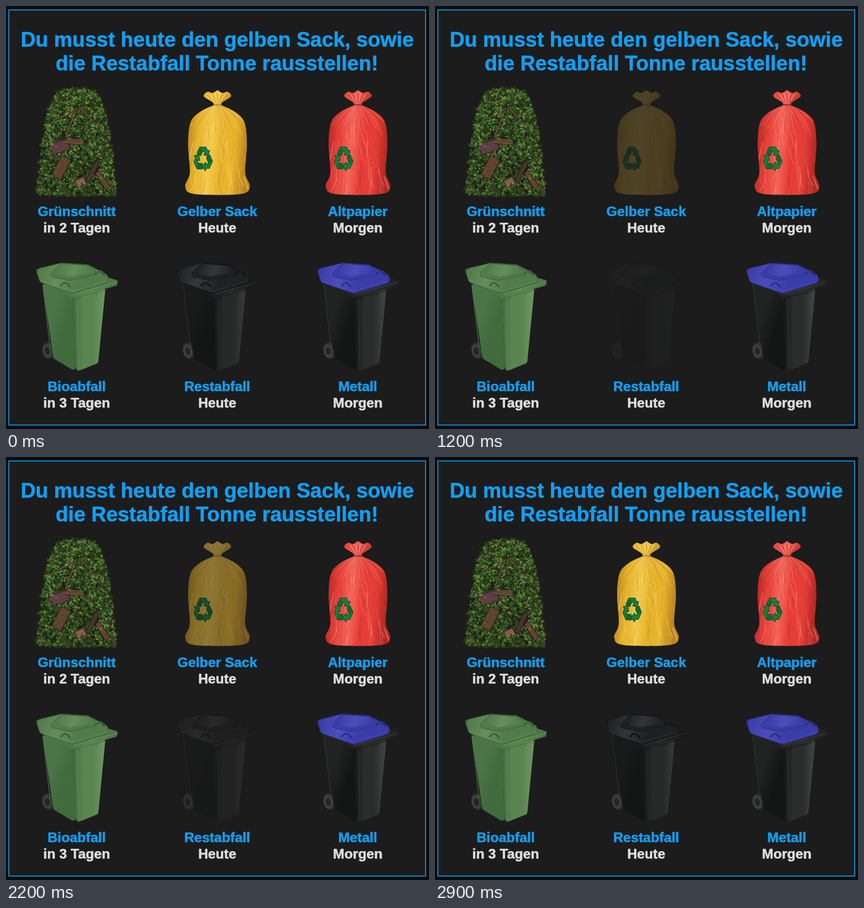
Animation of 748 by 749 pixels, one loop 3000 ms. Source, as an HTML page with a canvas:

```html
<!DOCTYPE html>
<html lang="de">
<head>
<meta charset="utf-8">
<title>Abfallkalender</title>
<style>
html, body { margin: 0; width: 100%; height: 100%; overflow: hidden; background: #0b0b0b; }
canvas { display: block; }
</style>
</head>
<body>
<canvas id="stage" width="748" height="749"></canvas>
<script>
const W = 748, H = 749, LOOP = 3000, STEP = 100, FAINTEST = 0.15;
const COLUMN = 248.5, ROW = 310;
const BLUE = '#119ff2', WHITE = '#dedede';
const stage = document.getElementById('stage').getContext('2d');

function seeded(seed) {
  return () => {
    seed = (seed * 1664525 + 1013904223) >>> 0;
    return seed / 4294967296;
  };
}

function layer(paint) {
  const canvas = document.createElement('canvas');
  canvas.width = W;
  canvas.height = H;
  const c = canvas.getContext('2d');
  c.lineJoin = c.lineCap = 'round';
  paint(c);
  return canvas;
}

function place(c, paint, dx, tone) {
  c.save();
  c.translate(dx, 0);
  paint(c, tone);
  c.restore();
}

function gradient(c, x0, y0, x1, y1, ...colours) {
  const g = c.createLinearGradient(x0, y0, x1, y1);
  colours.forEach((colour, i) => g.addColorStop(i / (colours.length - 1), colour));
  return g;
}

// Closed polygon with rounded corners.
function poly(c, points, radius, fill, line) {
  const [x, y] = points[0], [u, v] = points.at(-1);
  c.beginPath();
  c.moveTo((x + u) / 2, (y + v) / 2);
  points.forEach(([px, py], i) => c.arcTo(px, py, ...points[(i + 1) % points.length], radius));
  c.closePath();
  c.fillStyle = fill;
  c.fill();
  if (line) { c.strokeStyle = line; c.lineWidth = 1; c.stroke(); }
}

// Closed smooth curve passing through every point.
function smooth(c, points, fill) {
  const at = (i) => points[(i + points.length) % points.length];
  c.beginPath();
  c.moveTo(...at(0));
  for (let i = 0; i < points.length; i++) {
    const [a, b, d, e] = [at(i - 1), at(i), at(i + 1), at(i + 2)];
    c.bezierCurveTo(b[0] + (d[0] - a[0]) / 6, b[1] + (d[1] - a[1]) / 6,
      d[0] - (e[0] - b[0]) / 6, d[1] - (e[1] - b[1]) / 6, ...d);
  }
  c.fillStyle = fill;
  c.fill();
}

// Half widths with heights become a left and a right side.
function mirror(half, cx) {
  return [...half.map(([w, y]) => [cx - w, y]), ...half.map(([w, y]) => [cx + w, y]).reverse()];
}

function line(c, colour, width, ...points) {
  c.strokeStyle = colour;
  c.lineWidth = width;
  c.beginPath();
  points.forEach((p) => c.lineTo(...p));
  c.stroke();
}

function curve(c, colour, width, from, bend, to) {
  c.strokeStyle = colour;
  c.lineWidth = width;
  c.beginPath();
  c.moveTo(...from);
  c.quadraticCurveTo(...bend, ...to);
  c.stroke();
}

function ellipse(c, x, y, rx, ry, angle, fill) {
  c.fillStyle = fill;
  c.beginPath();
  c.ellipse(x, y, rx, ry, angle, 0, 7);
  c.fill();
}

function recycleArrows(c, x, y) {
  c.save();
  c.translate(x, y);
  c.scale(0.84, 1.12);
  for (let i = 0; i < 3; i++) {
    poly(c, [[-13, -9], [-7, -19], [6, -19], [10, -13], [14, -14], [11, -4], [1, -7],
      [4, -10], [0, -13], [-5, -5]], 0.5, '#16803c', '#17391f');
    poly(c, [[-13, -9], [-7, -19], [0, -13], [-5, -5]], 0.5, '#0f6930');
    c.rotate(Math.PI * 2 / 3);
  }
  c.restore();
}

function paintSack(c, tone) {
  const random = seeded(17), cx = 374;
  const body = mirror([[7, 176], [33, 189], [48, 207], [52, 245], [49, 295], [57, 320], [40, 333]], cx);
  smooth(c, body, gradient(c, 320, 220, 427, 230,
    tone.dark, tone.mid, tone.light, tone.mid, tone.mid, tone.dark));
  c.save();
  c.clip();
  for (let i = 0; i <= 40; i++) {
    const a = i / 20 - 1;
    c.globalAlpha = 0.2 + random() * 0.35;
    curve(c, i % 2 ? tone.shine : tone.dark, 0.6 + random() * 0.7,
      [cx + a * 5, 176], [cx + a * 27, 184], [cx + a * 50, 203 + random() * 26]);
  }
  for (let i = 0; i < 90; i++) {
    const x = 322 + random() * 104, y = 205 + random() * 115;
    c.globalAlpha = 0.1 + random() * 0.22;
    curve(c, i % 2 ? tone.shine : tone.dark, 0.7 + random() * 1.5,
      [x, y], [x + 5 - random() * 10, y + 12], [x + (x - cx) * 0.1 + 8 - random() * 16, y + 20 + random() * 20]);
  }
  c.restore();
  smooth(c, mirror([[6, 178], [8, 171], [24, 160], [18, 152], [9, 154], [0, 149]], cx),
    gradient(c, 350, 150, 396, 174, tone.mid, tone.light, tone.dark));
  for (let i = -4; i <= 4; i++) {
    line(c, i % 2 ? tone.shine : tone.dark, 0.8, [cx + i * 0.8, 173], [cx + i * 4.4, 155 + Math.abs(i) * 0.6]);
  }
  line(c, tone.dark, 2, [368, 175], [380, 175]);
  recycleArrows(c, 348.5, 271);
}

function plank(c, x, y, length, width, angle, colour) {
  c.save();
  c.translate(x, y);
  c.rotate(angle);
  c.fillStyle = '#241b14';
  c.fillRect(-length / 2 - 1, -width / 2 - 1, length + 2, width + 2);
  c.fillStyle = colour;
  c.fillRect(-length / 2, -width / 2, length, width);
  for (let v = -width / 2 + 2; v < width / 2 - 1; v += 3) {
    line(c, '#2c1c1899', 0.9, [-length / 2, v], [length / 2, v]);
  }
  c.restore();
}

function paintCuttings(c) {
  const random = seeded(91), cx = 125, top = 147, height = 188;
  const halfWidth = (t) => 71.5 * Math.pow(t, 0.23);
  const foliage = (darkest, lightest) =>
    `hsl(${70 + random() * 42} ${26 + random() * 24}% ${darkest + random() * (lightest - darkest)}%)`;
  const leaves = (count, size, darkest, lightest) => {
    for (let i = 0; i < count; i++) {
      const t = random();
      const x = cx + (random() * 2 - 1) * halfWidth(t), r = size * (0.5 + random());
      ellipse(c, x, top + t * height, r, r * 0.5, random() * 6.3, foliage(darkest, lightest));
    }
  };
  ellipse(c, cx, 328, 71, 10, 0, '#29351c');
  leaves(1500, 4.5, 9, 22);
  // Fern tips break up the silhouette.
  for (let i = 0; i < 160; i++) {
    const t = random() * 0.9, side = i % 2 ? 1 : -1;
    const x = cx + side * halfWidth(t) * (0.75 + random() * 0.25), y = top + t * height;
    line(c, foliage(16, 30), 0.9, [x - side * 5, y + 7], [x + side * random() * 4, y - random() * 6]);
  }
  leaves(1300, 2.2, 14, 43);

  const wood = '#6f4b38', bark = '#765a3d', maroon = '#6d4351';
  plank(c, 115, 207, 56, 2, 1.93, bark);
  plank(c, 147, 197, 52, 2, 0.78, bark);
  plank(c, 109, 191, 40, 2, -0.5, bark);
  plank(c, 95, 249, 32, 17, -0.35, maroon);
  plank(c, 122, 240, 32, 9, 0.1, wood);
  plank(c, 98, 286, 38, 17, 2.05, wood);
  plank(c, 153, 294, 38, 6, 2.03, '#4c3a2f');
  plank(c, 171, 308, 34, 8, 1, wood);
  plank(c, 132, 312, 16, 12, -0.5, '#9a6a5b');
  leaves(350, 2, 14, 45);
}

function paintBin(c, tone) {
  ellipse(c, 75, 610, 11, 15, -0.2, '#2c2d2c');
  ellipse(c, 73, 611, 8, 12, -0.2, '#3e403e');
  ellipse(c, 73, 611, 4.5, 7, -0.2, '#242524');

  const corner = [118, 510], foot = [124, 648];
  poly(c, [[64, 489], corner, foot, [84, 624]], 5,
    gradient(c, 65, 500, 124, 520, tone.left, tone.left, tone.shade));
  poly(c, [corner, [176, 498], [163, 632], foot], 5,
    gradient(c, 118, 560, 172, 560, tone.shade, tone.right, tone.right, tone.edge));
  line(c, tone.edge, 0.8, [65, 493], [78, 604]);
  line(c, tone.edge, 0.8, [126, 518], [129, 642]);
  line(c, tone.edge, 0.8, [174, 506], [162, 628]);

  // Rim below the lid, ending in the grip on the right.
  poly(c, [[59, 484], [118, 504], [174, 479], [198, 486], [196, 495], [118, 517]], 3,
    gradient(c, 110, 500, 190, 505, tone.left, tone.right, tone.left));
  line(c, tone.edge, 1, [119, 511], [196, 489]);
  line(c, tone.shade, 1.2, [119, 518], [177, 503]);
  for (const x of [131, 160]) ellipse(c, x, 555 - x * 0.28, 1.2, 1.2, 0, tone.shade);

  line(c, tone.lidDark, 2.5, [55, 472], [55, 467], [70, 463]);
  poly(c, [[53, 466], [98, 455], [145, 458], [179, 476], [183, 489], [118, 509], [60, 489]], 7,
    gradient(c, 60, 461, 163, 503, tone.lid, tone.lidLight, tone.lid, tone.lid), tone.lidDark);
  poly(c, [[75, 478], [97, 456], [146, 459], [164, 474], [112, 486]], 5, tone.lid, tone.lidDark);
  poly(c, [[88, 473], [102, 457], [142, 460], [155, 471], [113, 479]], 5,
    gradient(c, 90, 460, 150, 477, tone.lid, tone.lidLight, tone.lid));
  line(c, tone.lidLight, 1, [60, 486], [91, 498], [118, 505], [178, 487]);
  for (const [x, y] of [[104, 491], [165, 471]]) {
    curve(c, tone.lidDark, 3, [x - 7, y + 4], [x, y - 7], [x + 9, y + 6]);
    curve(c, tone.lidLight, 0.8, [x - 6, y + 1], [x, y - 7], [x + 8, y + 1]);
  }
}

function text(c, words, x, y, size, colour) {
  c.font = `bold ${size}px "Liberation Sans", Arial, sans-serif`;
  c.textAlign = 'center';
  c.fillStyle = c.strokeStyle = colour;
  c.lineWidth = 0.6;
  c.fillText(words, x, y);
  c.strokeText(words, x, y);
}

const yellow = { light: '#f3cb4c', mid: '#e8b52c', dark: '#bd851f', shine: '#ffe48c' };
const red = { light: '#f4665a', mid: '#e63f37', dark: '#b52824', shine: '#ffa59a' };
const green = { left: '#4b7546', right: '#5a8551', shade: '#416a3d', edge: '#6c9462',
  lid: '#517b4a', lidLight: '#668d5c', lidDark: '#395c36' };
const black = { left: '#181919', right: '#282929', shade: '#141515', edge: '#363737',
  lid: '#202122', lidLight: '#353637', lidDark: '#111213' };
const blue = { ...black, left: '#212222', right: '#2b2c2c', edge: '#414241',
  lid: '#3a3da6', lidLight: '#4b4eba', lidDark: '#2a2d7c' };

const still = layer((c) => {
  c.fillStyle = '#0b0b0b';
  c.fillRect(0, 0, W, H);
  c.fillStyle = '#1c1c1c';
  c.strokeStyle = '#0c86cd';
  c.lineWidth = 2;
  c.fillRect(5, 7, 737, 735);
  c.strokeRect(5, 7, 737, 735);
  text(c, 'Du musst heute den gelben Sack, sowie', 373.5, 71.5, 36.6, BLUE);
  text(c, 'die Restabfall Tonne rausstellen!', 373, 113.5, 36.6, BLUE);
  const labels = [
    ['Grünschnitt', 'in 2 Tagen'], ['Gelber Sack', 'Heute'], ['Altpapier', 'Morgen'],
    ['Bioabfall', 'in 3 Tagen'], ['Restabfall', 'Heute'], ['Metall', 'Morgen']
  ];
  labels.forEach(([name, day], i) => {
    const x = 125 + (i % 3) * COLUMN, y = 372 + Math.floor(i / 3) * ROW;
    text(c, name, x, y, 24.4, BLUE);
    text(c, day, x, y + 29, 24.2, WHITE);
  });
  place(c, paintCuttings, 0);
  place(c, paintSack, COLUMN, red);
  place(c, paintBin, 0, green);
  place(c, paintBin, COLUMN * 2, blue);
});

const dueToday = layer((c) => {
  place(c, paintSack, 0, yellow);
  place(c, paintBin, COLUMN, black);
});

function draw(now) {
  const time = Math.floor((now % LOOP) / STEP) * STEP;
  const pulse = (1 + Math.cos(time / LOOP * Math.PI * 2)) / 2;
  stage.globalAlpha = 1;
  stage.drawImage(still, 0, 0);
  stage.globalAlpha = FAINTEST + (1 - FAINTEST) * pulse;
  stage.drawImage(dueToday, 0, 0);
}

let start;
function tick(now) {
  start ??= now;
  draw(Math.max(0, now - start));
  requestAnimationFrame(tick);
}
draw(0);
requestAnimationFrame(tick);
</script>
</body>
</html>
```
